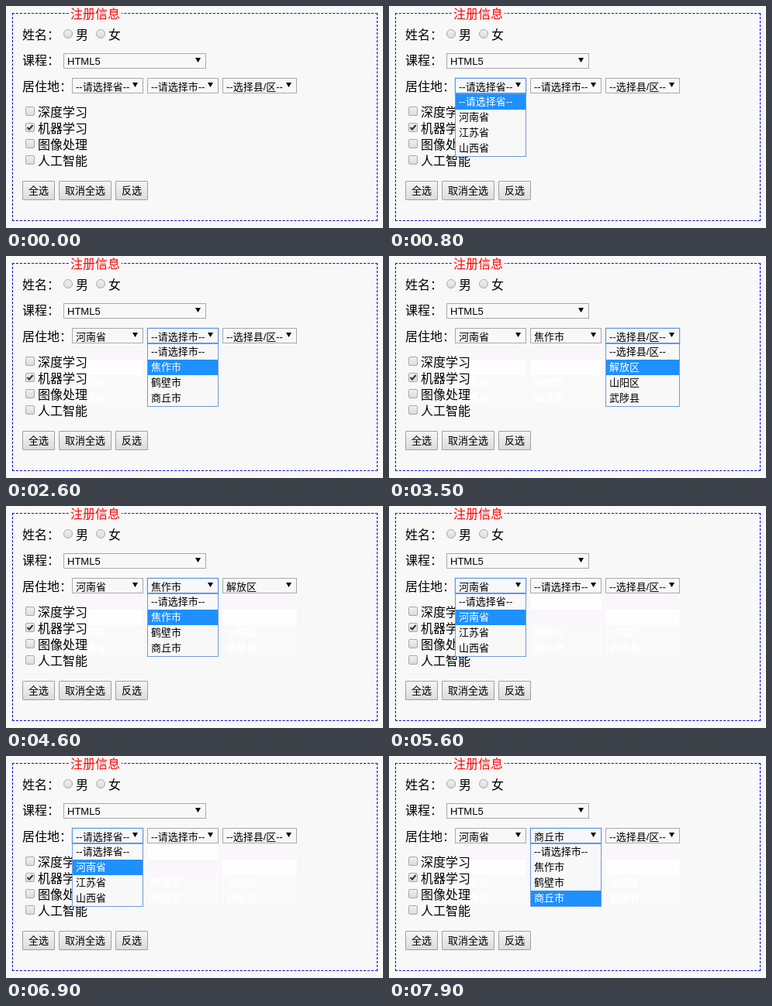
Recreate the animation shown at these times as an HTML page. Size 486 by 287 pixels, loop 8 s.

```html
<!DOCTYPE html>
<html lang="zh-CN">
<head>
<meta charset="utf-8">
<title>注册信息</title>
<style>
  html, body { margin: 0; width: 100%; height: 100%; overflow: hidden; background: #f8f8f8; }
  #stage { position: relative; width: 486px; height: 287px; overflow: hidden; color: #000;
    font: 16px/20px "Liberation Sans", "Noto Sans CJK SC", "Noto Sans CJK", sans-serif; }
  #stage div { position: absolute; box-sizing: border-box; white-space: pre; }
  .frame { left: 8px; top: 9px; width: 471px; height: 269px; border: 1px dashed #0000c4; }
  .gap { left: 81px; top: 0; width: 68px; height: 20px; background: #f8f8f8; }
  .radio, .check { width: 12px; height: 12px; border: 1px solid #a9a9a9;
    background: linear-gradient(#f0f0f0, #dcdcdc); }
  .radio { border-radius: 50%; }
  .check { border-radius: 2px; }
  .check svg { position: absolute; left: 0; top: 0; }
  .button { top: 226px; height: 25px; border: 1px solid #a0a0a0; border-radius: 1px;
    background: linear-gradient(#f5f5f5, #dcdcdc); font-size: 13px; line-height: 24px; text-align: center; }
  .select { height: 20px; border: 1px solid #a9a9a9; background: #f8f8f8; font-size: 13px; }
  .select .value { left: 4px; top: 1px; line-height: 20px; }
  .select::after { content: ""; position: absolute; right: 6px; top: 5px; width: 7px; height: 6px;
    background: #000; clip-path: polygon(0 0, 100% 0, 50% 100%); }
  .hover { border-color: #858585; }
  .focus { border-color: #5b94e6; box-shadow: 0 0 0 1px rgba(90, 150, 240, .2); }
  .list { top: 113px; height: 82px; border: 1px solid #6f9bd8; background: #f8f8f8; font-size: 13px; }
  .list div, .trace div { left: 0; width: 100%; height: 20px; padding-left: 4px; }
  .list .on { background: #1e90ff; color: #fff; }
  .trace { top: 113px; height: 82px; border: 1px solid #fbfbfb; font-size: 13px; font-weight: bold; color: #fff; }
  .trace div { background: #f9f9f9; }
  .trace div:nth-child(-n+2) { background: #faf6fb; color: transparent; }
  .trace div.on { background: #fefefe; }
</style>
</head>
<body>
<div id="stage"></div>
<script>
const stage = document.getElementById("stage");

function add(parent, cls, style = {}, text = "") {
  const el = document.createElement("div");
  el.className = cls;
  for (const key in style) {
    const v = style[key];
    el.style[key] = typeof v === "number" ? v + "px" : v;
  }
  el.textContent = text;
  parent.appendChild(el);
  return el;
}

const label = (x, cy, text, color = "#000") =>
  add(stage, "label", { left: x, top: cy - 10, color }, text);

function select(x, y, w, text) {
  const box = add(stage, "select", { left: x, top: y, width: w });
  return { box, value: add(box, "value", {}, text) };
}

function rows(cls, x, w, items) {
  const el = add(stage, cls, { left: x, width: w });
  items.forEach((text, i) => add(el, "", { top: i * 20 }, text));
  return el;
}

function light(list, row) {
  [...list.children].forEach((el, i) => el.classList.toggle("on", i === row));
}

// A pale trace of each list stays on the page once it has closed.
const menus = [
  { x: 85, w: 92, since: 1600, items: ["--请选择省--", "河南省", "江苏省", "山西省"] },
  { x: 182, w: 92, since: 2900, items: ["--请选择市--", "焦作市", "鹤壁市", "商丘市"] },
  { x: 279, w: 96, since: 3800, items: ["--选择县/区--", "解放区", "山阳区", "武陟县"] },
];

add(stage, "frame");
add(stage, "gap");
for (const m of menus) m.trace = rows("trace", m.x, m.w, m.items);

label(83, 11, "注册信息", "#f00");
label(21, 38, "姓名：");
[[74, "男"], [116, "女"]].forEach(([x, text]) => {
  add(stage, "radio", { left: x, top: 30 });
  label(x + 16, 38, text);
});
label(21, 71, "课程：");
label(21, 105, "居住地：");

["深度学习", "机器学习", "图像处理", "人工智能"].forEach((text, i) => {
  const box = add(stage, "check", { left: 25, top: 130 + i * 21 });
  if (i === 1) {
    box.innerHTML = '<svg width="10" height="10"><path d="M1.5 5L4 7.5L8.5 2" fill="none" stroke="#333" stroke-width="2"/></svg>';
  }
  label(41, 138 + i * 21, text);
});

[[21, 42, "全选"], [68, 68, "取消全选"], [141, 42, "反选"]].forEach(([left, width, text]) =>
  add(stage, "button", { left, width }, text));

for (const m of menus) Object.assign(m, select(m.x, 93, m.w, m.items[0]));
const course = select(74, 61, 184, "HTML5");
course.value.style.top = "0";
for (const m of menus) m.list = rows("list", m.x, m.w, m.items);
const boxes = [...menus, course].map(m => m.box);

// Each step changes some of: chosen values, focused menu, open menu, lit row, hovered box.
const steps = [
  [0, { values: [0, 0, 0], focus: -1, open: -1, row: 0, hover: -1 }],
  [200, { hover: 3 }],
  [400, { hover: 1 }],
  [500, { hover: 0 }],
  [800, { focus: 0, open: 0 }],
  [1300, { row: 1 }],
  [1600, { open: -1 }],
  [1700, { values: [1, 0, 0] }],
  [1900, { focus: -1, hover: -1 }],
  [2100, { hover: 1 }],
  [2300, { focus: 1, open: 1, row: 0 }],
  [2600, { row: 1 }],
  [2900, { open: -1 }],
  [3000, { values: [1, 1, 0], hover: 2 }],
  [3200, { focus: 2, open: 2, row: 0 }],
  [3500, { row: 1 }],
  [3800, { open: -1, values: [1, 1, 1] }],
  [4100, { hover: -1 }],
  [4300, { hover: 1 }],
  [4500, { focus: 1, open: 1, row: 1 }],
  [4700, { row: 0 }],
  [5000, { open: -1, values: [1, 0, 0], hover: -1 }],
  [5500, { focus: 0, open: 0, row: 1 }],
  [5800, { row: 0 }],
  [6100, { open: -1, values: [0, 0, 0] }],
  [6500, { open: 0 }],
  [6900, { row: 1 }],
  [7400, { open: -1 }],
  [7500, { values: [1, 3, 0] }],
  [7600, { hover: 1 }],
  [7800, { focus: 1, open: 1, row: 3 }],
];

function render(t) {
  const s = {};
  const lastRow = [];
  for (const [at, change] of steps) {
    if (at > t) break;
    Object.assign(s, change);
    if (s.open >= 0) lastRow[s.open] = s.row;
  }
  boxes.forEach((box, i) => {
    box.classList.toggle("hover", s.hover === i && s.focus !== i);
    box.classList.toggle("focus", s.focus === i);
  });
  menus.forEach((m, i) => {
    const text = m.items[s.values[i]];
    if (m.value.textContent !== text) m.value.textContent = text;
    m.trace.style.display = t >= m.since ? "" : "none";
    m.list.style.display = s.open === i ? "" : "none";
    light(m.list, s.row);
    light(m.trace, lastRow[i]);
  });
}

const start = performance.now();
function tick() {
  render((performance.now() - start) % 8000);
  requestAnimationFrame(tick);
}
tick();
</script>
</body>
</html>
```
